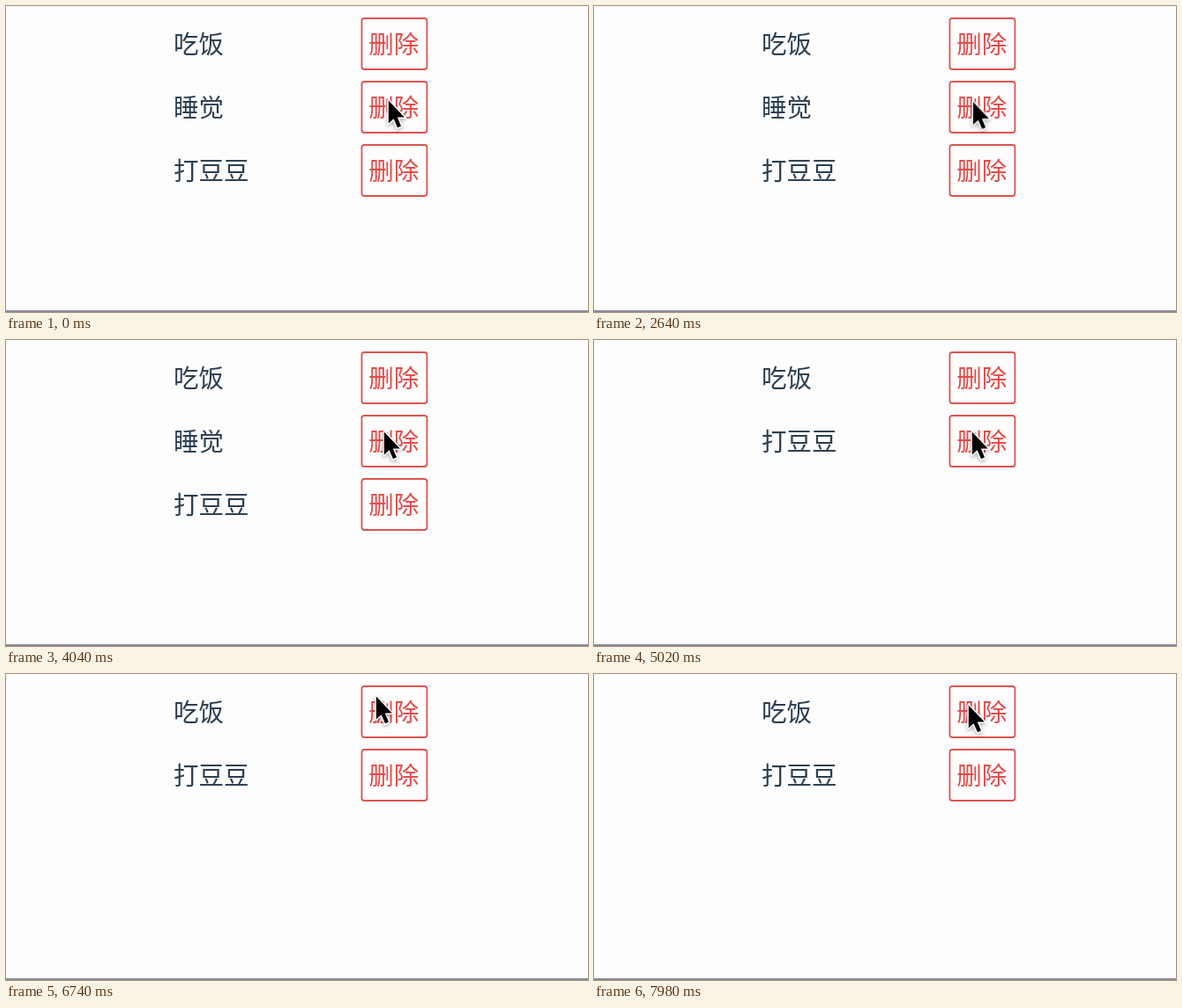
An HTML page that plays this animation: 660x348 px, repeating every 8 s.

```html
<!DOCTYPE html>
<html lang="zh-CN">
<head>
<meta charset="utf-8">
<title>列表</title>
<style>
  html, body { margin: 0; width: 100%; height: 100%; overflow: hidden; background: #fdfdfd; }
  svg { display: block; width: 660px; height: 348px; }
  text { font: 350 28.5px "Noto Sans CJK SC", "Noto Sans CJK", sans-serif; fill: #2c3e50; }
  .button text { fill: #e24a48; text-anchor: middle; }
  .button rect { fill: none; stroke: #dc5450; stroke-width: 1.8; }
  .removed { animation: remove 8s step-end infinite; }
  .last { animation: shift 8s step-end infinite; }
  .cursor {
    animation: wander 8s linear infinite;
    filter: drop-shadow(0 2px 2px rgba(0, 0, 0, .3));
  }
  .cursor path { stroke: #fff; stroke-width: 3; stroke-linejoin: round; paint-order: stroke; }

  @keyframes remove {
    0% { visibility: visible; }
    54.25%, 100% { visibility: hidden; }
  }
  @keyframes shift {
    0% { transform: translate(0, 144px); }
    54.25%, 100% { transform: translate(0, 72px); }
  }
  @keyframes wander {
    0%, 29.5% { transform: translate(433px, 106px); }
    34% { transform: translate(428px, 108px); }
    38.75% { transform: translate(421px, 105px); }
    40.5%, 41.7% { transform: translate(420px, 104px); }
    45.5%, 62.75% { transform: translate(428px, 103px); animation-timing-function: ease-in-out; }
    70.25%, 71.5% { transform: translate(432px, 8px); }
    72%, 73.2% { transform: translate(433px, 2px); }
    76% { transform: translate(418px, 6px); }
    79.5% { transform: translate(446px, 17px); }
    82.5% { transform: translate(436px, 12px); }
    84.25%, 85.5% { transform: translate(419px, 24px); }
    88% { transform: translate(403px, 36px); }
    93%, 94.2% { transform: translate(401px, 42px); }
    97% { transform: translate(418px, 27px); }
    99.75%, 100% { transform: translate(424px, 34px); }
  }
</style>
</head>
<body>
<svg viewBox="0 0 660 348">
  <defs>
    <g id="button" class="button">
      <rect x="403.4" y="14" width="74" height="58" rx="3"/>
      <text x="439.8" y="54">删除</text>
    </g>
  </defs>
  <rect y="346" width="660" height="2" fill="#8a8c9c"/>
  <g>
    <text x="190" y="54">吃饭</text>
    <use href="#button"/>
  </g>
  <g class="removed">
    <text x="190" y="126">睡觉</text>
    <use href="#button" y="72"/>
  </g>
  <g class="last">
    <text x="190" y="54">打豆豆</text>
    <use href="#button"/>
  </g>
  <g class="cursor">
    <path d="M.8 1.5V27.5L6.6 22.2L11 32.3L15 30.6L10.8 20.6H18.8Z"/>
  </g>
</svg>
</body>
</html>
```
